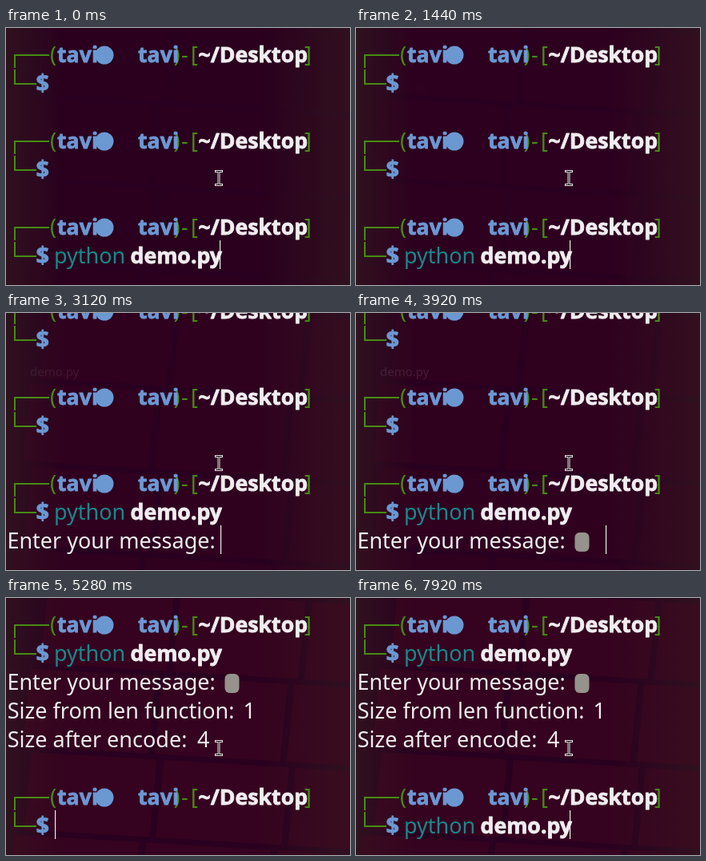
An HTML page with a canvas for the animation above (8 s loop, 430x322 px).

```html
<!DOCTYPE html>
<html lang="en">
<head>
<meta charset="utf-8">
<title>Terminal demo</title>
<style>
html, body { margin: 0; width: 100%; height: 100%; overflow: hidden; background: #29001f; }
canvas { display: block; width: 100%; height: 100%; }
</style>
</head>
<body>
<canvas id="stage" width="430" height="322"></canvas>
<script>
const ctx = document.getElementById('stage').getContext('2d');
const W = 430, H = 322, LOOP = 8000, ROW = 36, FIRST = 43;
const GREEN = '#468c13', BLUE = '#6c98d2', WHITE = '#f0edf0', TEAL = '#18888a';
const USER = 'tavi';

// Moments of the session, in ms.
const RUN = 2720, TYPED = 3920, RESULT = 4760, RECALL = 6080;

const baseline = row => FIRST + row * ROW;
const ramp = (t, from, to) => Math.min(1, Math.max(0, (t - from) / (to - from)));

function text(str, x, y, color, size = 27) {
  ctx.font = `400 ${size}px "Noto Sans", "Open Sans", sans-serif`;
  ctx.fillStyle = color;
  ctx.fillText(str, x, y);
}

// Extra-heavy face: bold with a thin outline of the same colour.
function heavy(str, x, y, color, size = 26.7) {
  ctx.font = `700 ${size}px "Noto Sans", "Open Sans", sans-serif`;
  ctx.fillStyle = ctx.strokeStyle = color;
  ctx.lineWidth = 0.8;
  ctx.lineJoin = 'round';
  ctx.fillText(str, x, y);
  ctx.strokeText(str, x, y);
}

function backdrop(t) {
  const shade = ctx.createLinearGradient(0, 0, W, 0);
  shade.addColorStop(0, '#30111f');
  shade.addColorStop(0.17, '#29001f');
  shade.addColorStop(0.74, '#29001f');
  shade.addColorStop(1, '#30111f');
  ctx.fillStyle = shade;
  ctx.fillRect(0, 0, W, H);

  // Slanted panes of the wallpaper become clearer as the picture settles.
  const clear = t < RESULT ? 0.05 + 0.15 * ramp(t, 800, 2400) : 0.4;
  ctx.save();
  ctx.transform(1, 0.06, -0.1, 1, 0, -10);
  ctx.fillStyle = `rgba(72, 8, 32, ${clear})`;
  for (let row = 0; row < 4; row++) {
    for (let col = 0; col < 3; col++) {
      ctx.fillRect(52 + col * 165 - (row % 2) * 12, row * 104 - 8, 157, 97);
    }
  }
  ctx.restore();

  if (t < RESULT) {
    text('demo.py', 30, 79, `rgba(120, 92, 110, ${0.3 * ramp(t, 1200, 3600)})`, 15);
  }
}

function prompt(row) {
  const y = baseline(row), mid = y - 10, x = 10;
  ctx.fillStyle = GREEN;
  ctx.fillRect(x, mid, 44, 2);
  ctx.fillRect(x, mid, 2, 17);
  ctx.fillRect(x, mid + 19, 2, 17);
  ctx.fillRect(x, mid + ROW, 28, 2);

  text('(', 55, y, GREEN);
  text(')', 209.5, y, GREEN);
  text('-', 219, y, GREEN);
  text('[', 231, y, GREEN);
  text(']', 373, y, GREEN);

  heavy(USER, 64, y, BLUE);
  heavy(USER, 165, y, BLUE);
  ctx.beginPath();
  ctx.arc(123, y - 9, 11.5, 0, Math.PI * 2);
  ctx.fill();
  heavy('~/Desktop', 240.5, y, WHITE);
  heavy('$', 37.5, y + ROW, BLUE, 29);
}

function command(row) {
  const y = baseline(row);
  text('python', 60, y, TEAL);
  heavy('demo.py', 155.5, y, WHITE);
}

function message(row, done) {
  const y = baseline(row);
  text('Enter your message:', 1.4, y, WHITE);
  if (!done) return;
  ctx.fillStyle = '#96928c';
  ctx.beginPath();
  ctx.roundRect(273.5, y - 20, 18, 24, 6);
  ctx.fill();
}

function result(label, value, x, row) {
  text(label, 1.8, baseline(row), WHITE);
  text(value, x, baseline(row), WHITE);
}

function caret(x, row) {
  ctx.fillStyle = WHITE;
  ctx.fillRect(x, baseline(row) - 29, 1.2, ROW);
}

function pointer(x, y) {
  const pass = (color, grow) => {
    ctx.fillStyle = color;
    for (const dy of [-9, 8]) ctx.fillRect(x - 4 - grow, y + dy - grow, 8 + 2 * grow, 1 + 2 * grow);
    ctx.fillRect(x - 0.5 - grow, y - 8, 1 + 2 * grow, 16);
  };
  pass('#e8e4e8', 1);
  pass('#120910', 0);
}

function before(t) {
  const running = t >= RUN, typed = t >= TYPED;
  const top = running ? -1 : 0;
  for (let i = 0; i < 3; i++) prompt(top + i * 3);
  command(top + 7);
  if (running) message(7, typed);
  caret(typed ? 312 : running ? 268 : 267, 7);
}

function after(t) {
  const recalled = t >= RECALL;
  prompt(0);
  command(1);
  message(2, true);
  result('Size from len function:', '1', 296.5, 3);
  result('Size after encode:', '4', 239, 4);
  prompt(6);
  if (recalled) command(7);
  caret(recalled ? 267 : 61, 7);
}

function draw(t) {
  backdrop(t);
  (t < RESULT ? before : after)(t);
  pointer(266, 188);
}

const start = performance.now();
function tick() {
  draw((performance.now() - start) % LOOP);
  requestAnimationFrame(tick);
}
tick();
</script>
</body>
</html>
```
